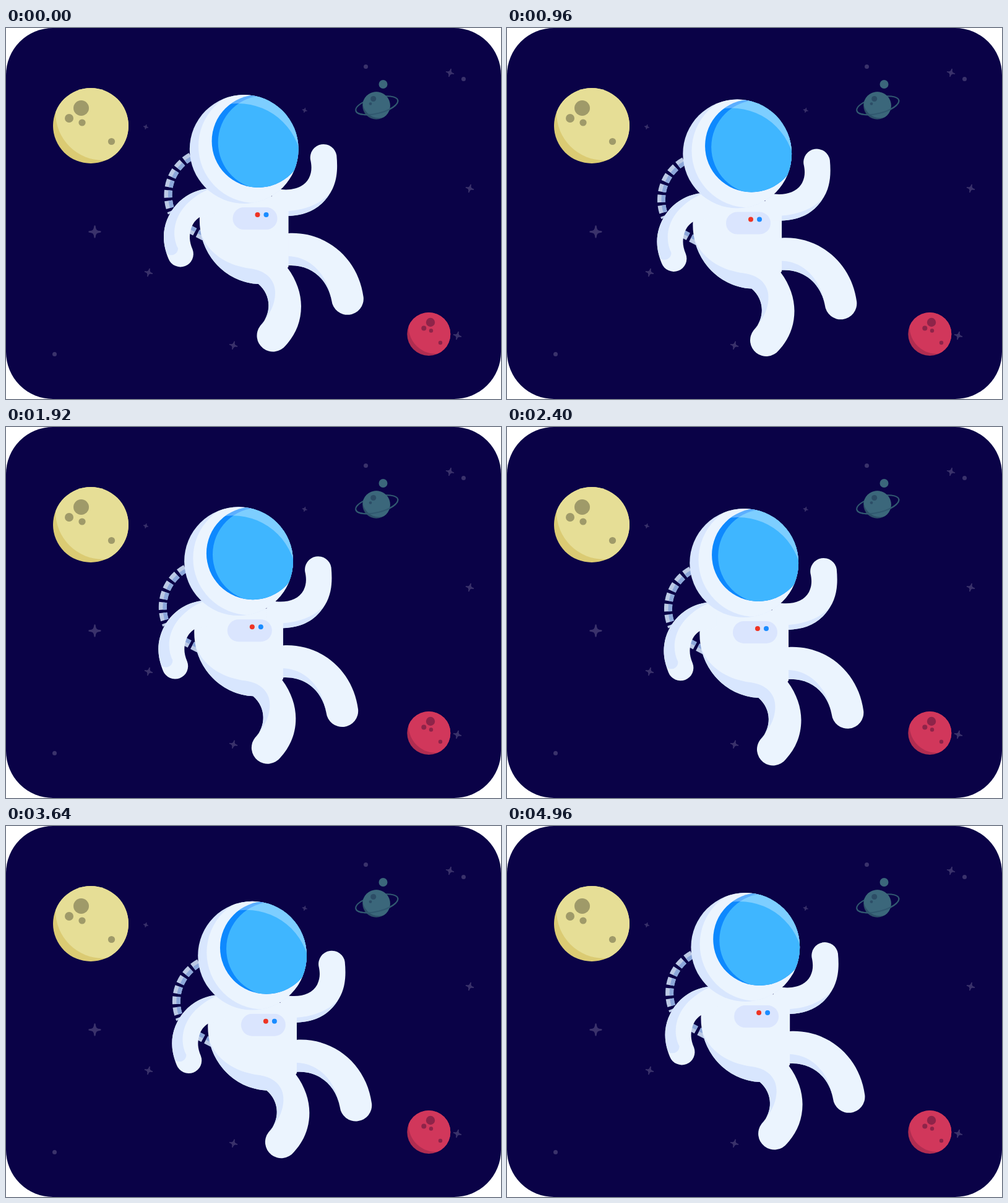
An HTML page that plays this animation: 800 by 600 pixels, repeating every 5000 ms.

```html
<!DOCTYPE html>
<html lang="en">
<head>
<meta charset="utf-8">
<title>Floating astronaut</title>
<style>
  html, body { margin: 0; width: 100%; height: 100%; overflow: hidden; background: #fff; }
  .stage { position: relative; width: 100%; height: 100%; overflow: hidden; overflow: clip; contain: paint; }
  svg { position: absolute; left: 0; top: 0; width: 800px; height: 600px; }

  .star { fill: #3a326b; stroke: #3a326b; stroke-width: 2.4; stroke-linejoin: round; }
  .lit { fill: #ebf4fe; }
  .shade { fill: #d8e6fe; }
  .hose { fill: none; stroke-width: 13; stroke-dasharray: 12 5; stroke-dashoffset: -1.5; }

  /* Constant-speed drift around a slightly wide ellipse */
  #astronaut {
    offset-path: path("M0 0A13.5 12 0 0 0 -13.5 12A13.5 12 0 0 0 0 24A13.5 12 0 0 0 13.5 12A13.5 12 0 0 0 0 0");
    offset-anchor: 0 0;
    offset-rotate: 0deg;
    animation: drift 5s linear infinite;
  }
  @keyframes drift {
    from { offset-distance: 0%; }
    to { offset-distance: 100%; }
  }
</style>
</head>
<body>
<div class="stage">

<svg viewBox="0 0 800 600">
  <defs>
    <path id="star" d="M0-9C.6-2.4 2.4-.6 9 0C2.4.6.6 2.4 0 9C-.6 2.4-2.4.6-9 0C-2.4-.6-.6-2.4 0-9Z"/>
    <clipPath id="moonClip"><circle cx="137" cy="158" r="61"/></clipPath>
    <clipPath id="redClip"><circle cx="683.3" cy="495" r="35"/></clipPath>
    <clipPath id="tealClip"><circle cx="598.5" cy="125.5" r="22.3"/></clipPath>
  </defs>

  <rect width="800" height="600" rx="76" fill="#0a0247"/>

  <g class="star">
    <use href="#star" transform="translate(143.5 329.5)"/>
    <use href="#star" transform="translate(230.5 395.5) rotate(15) scale(.68)"/>
    <use href="#star" transform="translate(226 160) rotate(15) scale(.42)"/>
    <use href="#star" transform="translate(367.5 513.3) rotate(15) scale(.68)"/>
    <use href="#star" transform="translate(717.5 72.4) rotate(15) scale(.68)"/>
    <use href="#star" transform="translate(749.5 259.5) rotate(15) scale(.68)"/>
    <use href="#star" transform="translate(729.5 497.5) rotate(15) scale(.68)"/>
    <use href="#star" transform="translate(482.7 133) rotate(15) scale(.42)"/>
  </g>
  <g fill="#3a326b">
    <circle cx="581.5" cy="62.5" r="3.5"/>
    <circle cx="739.5" cy="82.5" r="3.5"/>
    <circle cx="78.5" cy="527.5" r="3.5"/>
  </g>

  <!-- Yellow moon -->
  <circle cx="137" cy="158" r="61" fill="#dbcb73"/>
  <circle cx="157" cy="137" r="77" fill="#e6de96" clip-path="url(#moonClip)"/>
  <g fill="#9f9a69">
    <circle cx="121.5" cy="129.5" r="12.5"/>
    <circle cx="102" cy="146" r="7"/>
    <circle cx="123" cy="153" r="5.6"/>
    <circle cx="170.5" cy="183.5" r="5.6"/>
  </g>

  <!-- Red planet -->
  <circle cx="683.3" cy="495" r="35" fill="#b02d51"/>
  <circle cx="694.5" cy="483" r="44" fill="#d1375b" clip-path="url(#redClip)"/>
  <g fill="#8e2449">
    <circle cx="686" cy="476" r="7.2"/>
    <circle cx="675.3" cy="485.5" r="4"/>
    <circle cx="687" cy="489.5" r="3.2"/>
    <circle cx="702" cy="509" r="3.2"/>
  </g>

  <!-- Ringed planet -->
  <ellipse cx="599.3" cy="125.3" rx="35" ry="12.8" transform="rotate(-14 599.3 125.3)" fill="none" stroke="#315970" stroke-width="2"/>
  <circle cx="598.5" cy="125.5" r="22.3" fill="#2d5068"/>
  <circle cx="603" cy="118.5" r="27" fill="#3b677b" clip-path="url(#tealClip)"/>
  <path d="M564.3 125.3A35 12.8 0 0 0 634.3 125.3" transform="rotate(-14 599.3 125.3)" fill="none" stroke="#315970" stroke-width="2"/>
  <circle cx="593.7" cy="114.5" r="4.5" fill="#2c4d66"/>
  <circle cx="589" cy="122.5" r="2.3" fill="#2c4d66"/>
  <circle cx="609.5" cy="91" r="7" fill="#3b677b"/>
</svg>

<svg id="astronaut" viewBox="0 0 800 600">
  <defs>
    <path id="hose" d="M300 207A71.6 71.6 0 0 0 262 270A71.6 71.6 0 0 0 268 299M293.3 323.6L322 338.5"/>
    <clipPath id="hoseClip"><path d="M300 207A71.6 71.6 0 0 0 262 270A71.6 71.6 0 0 0 268 299L293.3 323.6L322 338.5Z"/></clipPath>
    <clipPath id="helmetClip"><circle cx="384.7" cy="196" r="87.9"/></clipPath>
    <clipPath id="visorClip"><circle cx="407.6" cy="183" r="75"/></clipPath>
  </defs>

  <use href="#hose" class="hose" stroke="#bccae5"/>
  <g clip-path="url(#hoseClip)"><use href="#hose" class="hose" stroke="#8ca7da"/></g>

  <!-- Right leg -->
  <path class="lit" d="M450 332H457C520 329 570 375 577.7 435A20 20 0 0 1 526.3 441C520 405 492 382 457 384H450Z"/>
  <path class="shade" d="M456 369C492 370 519 398 526 439C519 405 492 382 456 384Z"/>

  <!-- Torso and left leg -->
  <path class="lit" d="M313 306L330 262L456.6 275V386L455 388C470 408 477 430 477 450C477 475 468 496 452 513.5A20 20 0 0 1 411 481.5C430 462 429 432 408 414A99 103 0 0 1 313 306Z"/>
  <path class="shade" d="M315 333C330 371 365 385 395 389C425 393 436 412 435 430C434 452 424 465 410 483C430 462 429 432 408 414A99 103 0 0 1 315 333Z"/>

  <!-- Right arm -->
  <path class="lit" d="M430 255L445 261C465 263 482 257 489.5 243C495 232 494 222 492 213A20 20 0 0 1 534.3 206C537 235 534 258 515 279C500 296 480 303 456.6 304H430Z"/>
  <path class="shade" d="M456.6 296C485 294 508 284 523 268C508 293 485 303 456.6 304Z"/>

  <!-- Left arm -->
  <path class="lit" d="M340 257L325 260C285 264 255 300 255 338C255 350 258 362 262.5 373A20 20 0 0 0 301.5 358C296 345 296 335 299 325C302 315 307 310 313 306L340 300Z"/>
  <path class="shade" d="M331 259C285 262 255 300 255 338C255 348 257 357 260 365C266 370 278 367 278 356C265 330 271 285 331 259Z"/>

  <!-- Helmet -->
  <circle class="shade" cx="384.7" cy="196" r="87.9"/>
  <g clip-path="url(#helmetClip)">
    <circle class="lit" cx="403" cy="191" r="92"/>
    <g clip-path="url(#visorClip)">
      <rect x="330" y="105" width="150" height="160" fill="#0e89fe"/>
      <circle cx="418.7" cy="185" r="76" fill="#3fb6ff"/>
      <path d="M270 100H490V340H270ZM272 225a103 103 0 0 0 206 0a103 103 0 0 0-206 0Z" fill="#fff" fill-opacity=".32" fill-rule="evenodd"/>
    </g>
  </g>

  <!-- Chest panel -->
  <rect x="366.5" y="290" width="72" height="36" rx="18" fill="#dae5fe"/>
  <circle cx="406.5" cy="302" r="4" fill="#ee3424"/>
  <circle cx="420.5" cy="302" r="4" fill="#1a8cff"/>
</svg>

</div>
</body>
</html>
```
